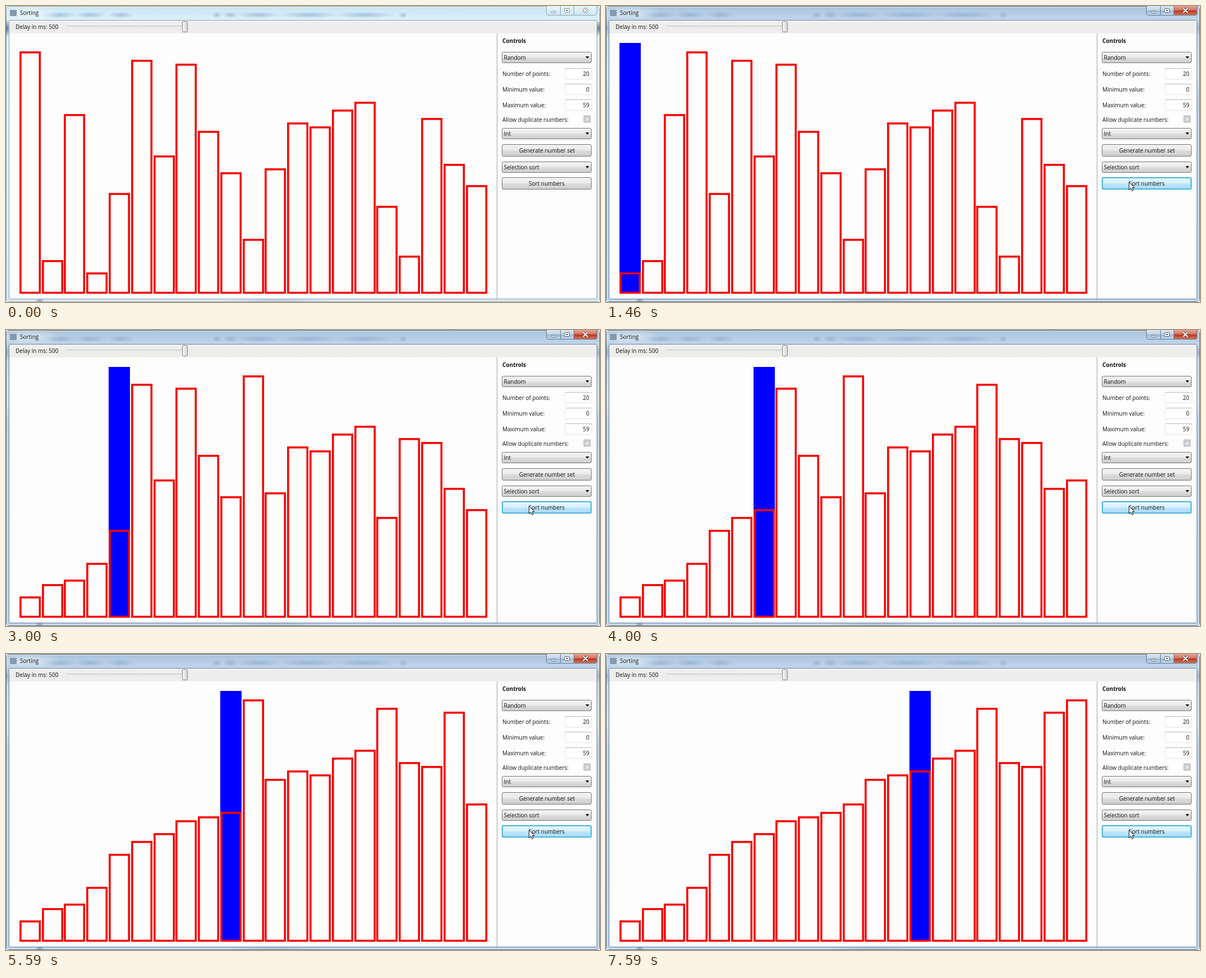
Animation of 1059x529 px, one loop 8 s. Source, as an HTML page with a canvas:

```html
<!DOCTYPE html>
<html lang="en">
<head>
<meta charset="utf-8">
<title>Sorting</title>
<style>
html, body { margin: 0; width: 100%; height: 100%; overflow: hidden; background: #fff; }
canvas { display: block; width: 1059px; height: 529px; }
</style>
</head>
<body>
<canvas id="stage" width="1059" height="529"></canvas>
<script>
const ctx = document.getElementById('stage').getContext('2d');
const W = 1059, H = 529, LOOP = 8000;
const FONT = '10px "Open Sans", "Noto Sans", sans-serif';
const START = [58, 8, 43, 5, 24, 56, 33, 55, 39, 29, 13, 30, 41, 40, 44, 46, 21, 9, 42, 31, 26];
const PRESS = 790, RELEASE = 880;

// One snapshot of the values after each selection-sort pass.
const passes = [START];
for (let i = 0; i < START.length; i++) {
  const a = passes[i].slice();
  let m = i;
  for (let j = i + 1; j < a.length; j++) if (a[j] < a[m]) m = j;
  [a[i], a[m]] = [a[m], a[i]];
  passes.push(a);
}

const clamp = (v, lo = 0, hi = 1) => Math.min(hi, Math.max(lo, v));
const mix = (a, b, k) => a + (b - a) * k;
const mixRgb = (a, b, k) => `rgb(${a.map((v, i) => Math.round(mix(v, b[i], k)))})`;

// Index of the running pass; each takes a little over the 500 ms delay.
function passAt(t) {
  if (t < RELEASE) return -1;
  if (t < 1500) return 0;
  const tick = Math.floor((t + 0.5) * 0.024) / 0.024;
  return Math.max(1, Math.floor((tick - 1461) / 504) + 1);
}

function rect(x, y, w, h, color) {
  ctx.fillStyle = color;
  ctx.fillRect(x, y, w, h);
}

function gradient(x0, y0, x1, y1, stops) {
  const g = ctx.createLinearGradient(x0, y0, x1, y1);
  stops.forEach(([p, c]) => g.addColorStop(p, c));
  return g;
}

function box(x, y, w, h, r, fill, stroke, line = 1) {
  ctx.beginPath();
  ctx.roundRect(x + line / 2, y + line / 2, w - line, h - line, r);
  ctx.fillStyle = fill;
  ctx.fill();
  ctx.strokeStyle = stroke;
  ctx.lineWidth = line;
  ctx.stroke();
}

function text(s, x, y, align = 'left', bold = false) {
  ctx.font = (bold ? 'bold ' : '') + FONT;
  ctx.textAlign = align;
  ctx.fillStyle = '#111';
  ctx.fillText(s, x, y);
}

function smear(x, y, rx, ry, rgb, alpha) {
  ctx.save();
  ctx.translate(x, y);
  ctx.scale(rx, ry);
  const g = ctx.createRadialGradient(0, 0, 0, 0, 0, 1);
  g.addColorStop(0, `rgba(${rgb},${alpha})`);
  g.addColorStop(1, `rgba(${rgb},0)`);
  ctx.fillStyle = g;
  ctx.fillRect(-1, -1, 2, 2);
  ctx.restore();
}

function poly(points, fill, stroke) {
  ctx.beginPath();
  points.forEach(([x, y]) => ctx.lineTo(x, y));
  ctx.closePath();
  ctx.fillStyle = fill;
  ctx.fill();
  if (stroke) {
    ctx.strokeStyle = stroke;
    ctx.lineWidth = 1;
    ctx.stroke();
  }
}

function captionButtons(active) {
  const edge = active ? '#61798f' : '#8fa5b5';
  const pale = active
    ? gradient(0, 0, 0, 17, [[0, '#d8e6f3'], [0.48, '#c0d3e6'], [0.5, '#9fb9d2'], [1, '#c3dcf0']])
    : gradient(0, 0, 0, 17, [[0, '#e6f5fb'], [1, '#cfe7f2']]);
  const red = gradient(0, 0, 0, 17, [[0, '#e5a596'], [0.46, '#d0705c'], [0.5, '#b93720'], [1, '#d9785a']]);
  ctx.save();
  ctx.beginPath();
  ctx.roundRect(963, -4, 91, 21, 4);
  ctx.clip();
  rect(963, 0, 49, 17, pale);
  rect(1012, 0, 42, 17, active ? red : pale);
  ctx.restore();
  ctx.strokeStyle = edge;
  ctx.lineWidth = 1;
  ctx.beginPath();
  ctx.roundRect(963.5, -4, 90, 20.5, 4);
  for (const x of [988.5, 1012.5]) {
    ctx.moveTo(x, 0);
    ctx.lineTo(x, 16);
  }
  ctx.stroke();

  const ink = active ? '#4f5f70' : '#77838d';
  box(971, 9, 10, 4, 1, '#fff', ink);
  box(995, 4, 10, 8, 1, '#fff', ink);
  box(998, 7, 4, 2, 0, '#fff', ink);
  ctx.lineCap = 'butt';
  for (const [w, c] of [[4, active ? '#70483f' : ink], [2, '#fff']]) {
    ctx.strokeStyle = c;
    ctx.lineWidth = w;
    ctx.beginPath();
    ctx.moveTo(1029, 4); ctx.lineTo(1037, 12);
    ctx.moveTo(1037, 4); ctx.lineTo(1029, 12);
    ctx.stroke();
  }
}

function windowFrame(active) {
  rect(0, 0, W, H, '#e8eef2');
  const glass = active
    ? gradient(0, 0, 0, H, [[0, '#a9c3dc'], [0.045, '#bdd5ea'], [0.25, '#cfe2f1'], [0.3, '#b5d1ea'], [1, '#b8d4ec']])
    : gradient(0, 0, 0, H, [[0, '#c8e6f2'], [0.045, '#daf1f9'], [0.3, '#dceefa'], [1, '#d4e7f5']]);
  box(0, 0, W, H, 5, glass, active ? '#46586a' : '#7f949f');
  ctx.strokeStyle = 'rgba(255,255,255,.65)';
  ctx.strokeRect(1.5, 1.5, W - 3, H - 3);

  const k = active ? 0.28 : 0.35;
  for (const [x, w] of [[95, 32], [150, 28], [205, 24], [376, 9], [400, 14], [450, 40], [540, 55], [640, 55], [708, 8]])
    smear(x, 16, w, 6, '78,112,160', k);
  smear(40, 12, 60, 14, '255,255,255', 0.55);
  smear(2, 40, 5, 16, '30,60,110', active ? 0.25 : 0.7);
  smear(1056, 40, 5, 14, '30,60,110', active ? 0.25 : 0.7);
  smear(60, 526, 8, 4, '50,80,120', 0.5);
  smear(480, 526, 90, 4, '95,130,160', 0.25);

  box(7, 7, 12, 11, 0, '#8499ad', '#8499ad');
  text('Sorting', 25, 16);
  captionButtons(active);

  box(5, 25, 1049, 499, 1, '#fdfdfd', active ? '#75879a' : '#92a2ad');
  rect(6, 26, 1047, 23, gradient(0, 26, 0, 49, [[0, '#f0f0ef'], [0.5, '#ececec'], [1, '#eeeeea']]));
}

function toolbar() {
  text('Delay in ms: 500', 17, 41);
  rect(108, 35, 208, 1, '#c3c6ca');
  rect(108, 36, 208, 2, '#e4e7e8');
  box(314, 27, 10, 20, 2, gradient(314, 0, 324, 0, [[0, '#f5f5f5'], [0.5, '#e8e8e8'], [1, '#d2d2d2']]), '#858585');
}

function grayFace(y, h) {
  return gradient(0, y, 0, y + h, [[0, '#f3f3f3'], [0.49, '#ebebeb'], [0.51, '#dddddd'], [1, '#cdcdcd']]);
}

function combo(label, y) {
  box(884, y, 160, 20, 2, grayFace(y, 20), '#747474');
  text(label, 887.5, y + 14);
  poly([[1033, y + 8], [1040, y + 8], [1036.5, y + 12]], '#111');
}

function field(label, value, y) {
  text(label, 885, y + 4);
  box(996, y - 10, 49, 20, 1, '#fff', '#e0e3e8');
  rect(997, y - 10, 47, 1, '#b8bac0');
  text(value, 1040, y + 4, 'right');
}

function sortButton(t, hover) {
  const y = 306, h = 22;
  let face = grayFace(y, h), edge = '#747474';
  const glow = clamp((t - 940) / 480);
  if (t >= PRESS && t < RELEASE) {
    face = gradient(0, y, 0, y + h, [[0, '#c2e4f6'], [0.49, '#a9d9f2'], [0.51, '#90cbeb'], [1, '#72bbdf']]);
    edge = '#2c628b';
  } else if (hover > 0) {
    const stops = [
      [0, [243, 243, 243], [234, 246, 253]], [0.49, [235, 235, 235], [217, 240, 252]],
      [0.51, [221, 221, 221], [190, 230, 253]], [1, [205, 205, 205], [167, 217, 245]]
    ];
    face = gradient(0, y, 0, y + h, stops.map(([p, a, b]) => [p, mixRgb(a, b, hover)]));
    edge = mixRgb([116, 116, 116], [60, 127, 177], hover);
  }
  box(884, y, 160, h, 2.5, face, edge);
  if (glow > 0) {
    ctx.globalAlpha = glow;
    box(884, y, 160, h, 2.5, 'transparent', '#2f9fc4', 1);
    box(885, y + 1, 158, h - 2, 2, 'transparent', '#56cbea', 1);
    ctx.globalAlpha = 1;
  }
  text('Sort numbers', 964, y + 15, 'center');
}

function panel(t, hover) {
  rect(875, 49, 1, 474, '#a0a2a8');
  text('Controls', 885, 65.5, 'left', true);
  combo('Random', 82);
  field('Number of points:', '20', 121);
  field('Minimum value:', '0', 149);
  field('Maximum value:', '59', 177);
  text('Allow duplicate numbers:', 885, 207);
  box(1030, 196, 12, 12, 0, '#f4f4f4', '#8e8f8f');
  box(1032, 198, 8, 8, 0, gradient(1032, 198, 1040, 206, [[0, '#cbcfd5'], [1, '#f0f0f0']]), '#b5bac2');
  combo('Int', 218);
  box(884, 247, 160, 22, 2.5, grayFace(247, 22), '#747474');
  text('Generate number set', 964.5, 262, 'center');
  combo('Selection sort', 278);
  sortButton(t, hover);
}

function bars(pass) {
  const left = i => Math.round(23.9 + i * 39.78);
  if (pass >= 0) rect(left(pass), 66, 38, 448, '#0000ff');
  ctx.strokeStyle = '#f40404';
  ctx.lineWidth = 3.6;
  passes[pass + 1].forEach((v, i) => {
    const top = Math.round(513.2 - 7.45 * v);
    ctx.strokeRect(left(i) + 1.9, top + 1.9, 34.4, 510.6 - top);
  });
}

function pointer(x, y) {
  const shape = [[0, 0], [0, 14], [3.2, 11], [5.4, 16], [7.6, 15], [5.5, 10.2], [9.8, 10.2]];
  poly(shape.map(([dx, dy]) => [x + 0.5 + dx, y + 0.5 + dy]), '#fff', '#111');
}

function draw(t) {
  ctx.clearRect(0, 0, W, H);
  const active = t >= PRESS;
  const k = 1 - (1 - clamp((t - 30) / 550)) ** 2;
  const x = mix(1062, 932, k), y = mix(120, 314, k);
  windowFrame(active);
  toolbar();
  panel(t, clamp((t - 430) / 150));
  bars(passAt(t));
  if (t >= 40) pointer(Math.round(x), Math.round(y));
}

const begin = performance.now();
function loop() {
  draw((performance.now() - begin) % LOOP);
  requestAnimationFrame(loop);
}
loop();
</script>
</body>
</html>
```
